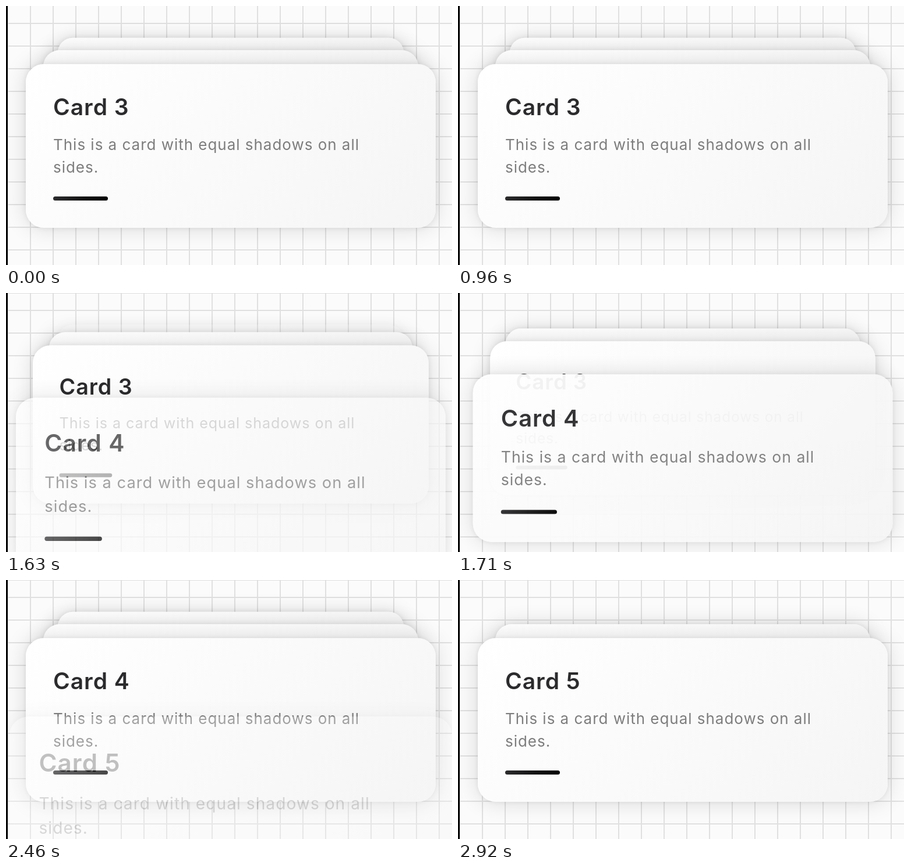
An HTML page that plays this animation: 766 by 446 pixels, repeating every 3.25 s.

```html
<!DOCTYPE html>
<html lang="en">
<head>
<meta charset="utf-8">
<title>Card stack</title>
<style>
  html, body { margin: 0; width: 100%; height: 100%; overflow: hidden; }
  #stage {
    position: relative; width: 766px; height: 446px; overflow: hidden;
    background:
      linear-gradient(90deg, #e0e0e0 2px, transparent 2px) 41px 29px / 39px 39px,
      linear-gradient(#e0e0e0 2px, transparent 2px) 41px 29px / 39px 39px,
      #fbfbfb;
    font-family: Inter, sans-serif;
    font-optical-sizing: none;
  }
  .edge { position: absolute; z-index: 9; left: 0; top: 0; }
  #left { width: 3px; height: 446px; background: #000; }
  #top { width: 766px; height: 1px; background: #dedede; }
  .card {
    position: absolute; left: 34px; top: 100px; width: 704px; height: 282px;
    border-radius: 31px;
    background: linear-gradient(135deg, #fff, #f5f5f5);
    box-shadow: 0 0 39px rgba(0, 0, 0, .14), 0 0 10px rgba(0, 0, 0, .08);
  }
  .card > * { position: absolute; left: 47px; margin: 0; white-space: nowrap; }
  h2 { top: 50.7px; font-size: 39px; font-weight: 600; line-height: 46px; letter-spacing: .975px; color: #2b2b2d; }
  p { top: 119px; font-size: 26px; line-height: 39px; letter-spacing: .975px; color: #7d7d7d; }
  .bar {
    top: 227.7px; width: 93.6px; height: 7.8px; border-radius: 4px;
    background: linear-gradient(90deg, #2b2b2d, #000);
  }
</style>
</head>
<body>
<div id="stage">
  <div id="top" class="edge"></div>
  <div id="left" class="edge"></div>
</div>
<script>
const LOOP = 3250;
const FPS = 24;
const CUT = 66;              // tick at which the last entrance snaps to rest
const FIRST_ENTRY = 36;
const ENTRY_TICKS = { 4: FIRST_ENTRY, 5: 58 };

// Resting places, from the front of the stack to the back.
const SLOTS = [
  { scale: 1, y: 0 },
  { scale: 0.915, y: -36 },
  { scale: 0.845, y: -67 },
  { scale: 0.845, y: -67 },
];

const stage = document.getElementById('stage');
const topEdge = document.getElementById('top');

const clamp = v => Math.min(1, Math.max(0, v));
const mix = (a, b, p) => a + (b - a) * p;
const easeOut = v => 1 - (1 - clamp(v)) ** 2;

const cards = [1, 2, 3, 4, 5].map(number => {
  const el = document.createElement('div');
  el.className = 'card';
  el.innerHTML = `<h2>Card ${number}</h2>
    <p>This is a card with equal shadows on all<br>sides.</p>
    <div class="bar"></div>`;
  stage.append(el);
  return { el, number };
});

function sinceEntry(number, tick) {
  if (tick >= CUT || !(number in ENTRY_TICKS)) return Infinity;
  return (tick - ENTRY_TICKS[number]) * 1000 / FPS;
}

// How far newer cards have pushed this one back, in slots.
function depthOf(number, tick) {
  let depth = 0;
  for (let newer = number + 1; newer <= cards.length; newer++) {
    depth += easeOut((sinceEntry(newer, tick) - 42) / 362);
  }
  return depth;
}

function poseCard({ el, number }, tick) {
  const age = sinceEntry(number, tick);
  const depth = depthOf(number, tick);
  const slot = Math.floor(depth);
  const from = SLOTS[Math.min(slot, 3)];
  const to = SLOTS[Math.min(slot + 1, 3)];
  const rise = 1 - easeOut(age / 407);
  const scale = mix(from.scale, to.scale, depth - slot) + 0.1 * rise;
  const y = mix(from.y, to.y, depth - slot) + 182 * rise;
  const gone = tick >= CUT && number < 4;
  const opacity = gone ? 0 : easeOut(age / 272) * clamp(1 - 2 * (depth - 2));

  el.style.visibility = opacity > 0 ? 'visible' : 'hidden';
  el.style.opacity = opacity;
  el.style.transform = `translateY(${y}px) scale(${scale})`;
}

function render(now) {
  const time = now % LOOP;
  const tick = Math.floor((time + 5) * FPS / 1000);
  topEdge.style.visibility = tick >= FIRST_ENTRY ? 'visible' : 'hidden';
  cards.forEach(card => poseCard(card, tick));
}

const start = performance.now();
function loop() {
  render(performance.now() - start);
  requestAnimationFrame(loop);
}
loop();
</script>
</body>
</html>
```
